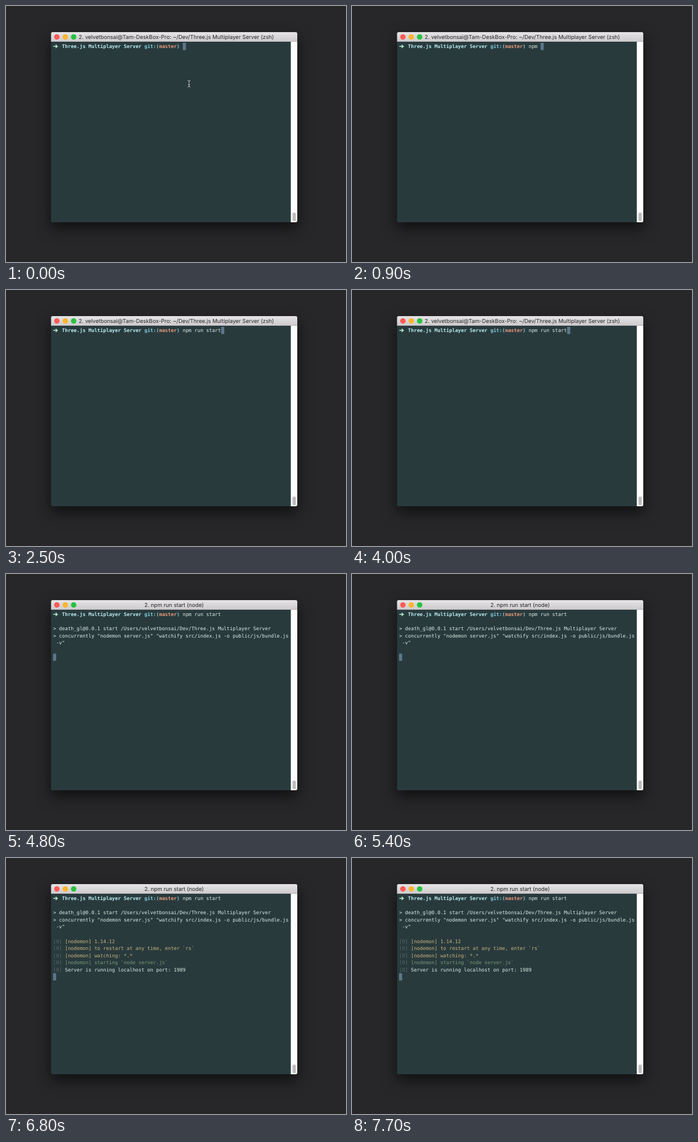
Write an HTML page that moves like this. It is 600 px wide and 451 px high and loops after 8000 ms.

```html
<!DOCTYPE html>
<html lang="en">
<head>
<meta charset="utf-8">
<title>Terminal session</title>
<style>
  html, body { margin: 0; width: 100%; height: 100%; overflow: hidden; background: #272628; }
  svg { display: block; width: 600px; height: 451px; }
  text { white-space: pre; text-rendering: geometricPrecision; }
  .mono { font: 8.645px "DejaVu Sans Mono", monospace; fill: #dfeee8; }
  .title { font: 9.6px Inter, sans-serif; fill: #262426; text-anchor: middle; }
  .window { filter: drop-shadow(0 11px 13px rgba(0, 0, 0, .6)); }
  .path { fill: #b8ecee; font-weight: bold; }
  .git { fill: #84cbd9; font-weight: bold; }
  .branch { fill: #e89a7c; font-weight: bold; }
  .dim { fill: #53676a; }
  .info { fill: #c8b57c; }
  .start { fill: #7a9878; }
</style>
</head>
<body>
<svg viewBox="0 0 600 451">
  <defs>
    <linearGradient id="bar" x2="0" y2="1">
      <stop offset="0" stop-color="#e6e4e6"/>
      <stop offset="1" stop-color="#cccacc"/>
    </linearGradient>
    <clipPath id="frame"><rect x="79.5" y="46" width="434.5" height="335" rx="3"/></clipPath>
  </defs>
  <rect width="600" height="451" fill="#272628"/>
  <g class="window">
    <g clip-path="url(#frame)">
      <rect x="79" y="46" width="436" height="336" fill="#293a3d"/>
      <rect x="79" y="46" width="436" height="17" fill="url(#bar)"/>
      <rect x="79" y="62.4" width="436" height=".6" fill="#a9a6a9"/>
      <rect x="502.6" y="63" width="12" height="319" fill="#fcfcfc"/>
      <rect x="505.5" y="364" width="6" height="15" rx="2.5" fill="#bdbdbd"/>
    </g>
  </g>
  <circle cx="89.8" cy="54.5" r="4.8" fill="#fb5a54"/>
  <circle cx="104.6" cy="54.5" r="4.8" fill="#fbb52e"/>
  <circle cx="119.4" cy="54.5" r="4.8" fill="#29c240"/>
  <text id="title" class="title" y="57.9"></text>
  <rect id="caret" width="5.5" height="12.6" fill="#5d7789"/>
  <path d="M83.6 71.2H90M87.6 68.4L90.6 71.2L87.6 74" fill="none" stroke="#a9e4c0" stroke-width="1.7"/>
  <g id="screen" class="mono"></g>
  <g id="pointer" fill="none" stroke-linecap="round">
    <g stroke="#1b2526" stroke-width="2">
      <path id="beam" d="M320.8 131.2Q323 131.2 323 133Q323 131.2 325.2 131.2M323 133V141M320.8 142.8Q323 142.8 323 141Q323 142.8 325.2 142.8M321.8 138.6H324.2"/>
    </g>
    <use href="#beam" stroke="#e4e9e6" stroke-width=".9"/>
  </g>
</svg>
<script>
const LOOP = 8000, LEFT = 83.2, CELL = 5.205, ROW = 12.56;
const $ = id => document.getElementById(id);
const NS = "http://www.w3.org/2000/svg";

function make(tag, parent, attrs, text = "") {
  const node = document.createElementNS(NS, tag);
  for (const key in attrs) node.setAttribute(key, attrs[key]);
  node.textContent = text;
  return parent.appendChild(node);
}

// Each span is [class, text]; a line appears at its time.
function addLine(row, col, time, ...spans) {
  const node = make("text", $("screen"), { x: LEFT + col * CELL, y: 74.2 + row * ROW });
  const parts = spans.map(([name, text]) => make("tspan", node, { class: name }, text));
  return { node, time, parts };
}

const dim = ["dim", "[0] "];
const prompt = addLine(0, 3, 0,
  ["path", "Three.js Multiplayer Server "], ["git", "git:("],
  ["branch", "master"], ["git", ") "], ["", ""]);
const typed = prompt.parts[4];

const lines = [
  prompt,
  addLine(2, 0, 4800, ["", "> death_gl@0.0.1 start /Users/velvetbonsai/Dev/Three.js Multiplayer Server"]),
  addLine(3, 0, 4800, ["", '> concurrently "nodemon server.js" "watchify src/index.js -o public/js/bundle.js']),
  addLine(4, 0, 4800, ["", ' -v"']),
  addLine(6, 0, 6000, dim, ["info", "[nodemon] 1.14.12"]),
  addLine(7, 0, 6000, dim, ["info", "[nodemon] to restart at any time, enter `rs`"]),
  addLine(8, 0, 6000, dim, ["info", "[nodemon] watching: *.*"]),
  addLine(9, 0, 6200, dim, ["start", "[nodemon] starting `node server.js`"]),
  addLine(10, 0, 6600, dim, ["", "Server is running localhost on port: 1989"])
];

const COMMAND = "npm run start", PROMPT_COLS = 44, ENTER = 4300;
const typing = [[0, 0], [100, 1], [500, 3], [900, 4], [1100, 5], [1200, 6],
  [1300, 7], [1500, 8], [1900, 9], [2000, 11], [2100, 12], [2500, 13]];
const caretRows = [[0, 0], [ENTER, 1], [4800, 6], [6000, 9], [6200, 10], [6600, 11]];
const titles = [
  [0, ["2. velvetbonsai@Tam-DeskBox-Pro: ~/Dev/Three.js Multiplayer Server (zsh)", 300.5]],
  [ENTER, ["2. npm run start (node)", 296.6]]
];

function valueAt(steps, t) {
  let value;
  for (const [time, next] of steps) if (t >= time) value = next;
  return value;
}

function setText(node, text) {
  if (node.textContent !== text) node.textContent = text;
}

function draw(t) {
  const count = valueAt(typing, t), row = valueAt(caretRows, t);
  const [title, center] = valueAt(titles, t);
  setText(typed, COMMAND.slice(0, count));
  setText($("title"), title);
  $("title").setAttribute("x", center);
  $("caret").setAttribute("x", LEFT - 0.2 + (row ? 0 : (PROMPT_COLS + count) * CELL));
  $("caret").setAttribute("y", 65 + row * ROW);
  $("pointer").style.display = t < 100 ? "" : "none";
  for (const line of lines) line.node.style.display = t >= line.time ? "" : "none";
}

const begin = performance.now();
function tick() {
  draw((performance.now() - begin) % LOOP);
  requestAnimationFrame(tick);
}
tick();
</script>
</body>
</html>
```
